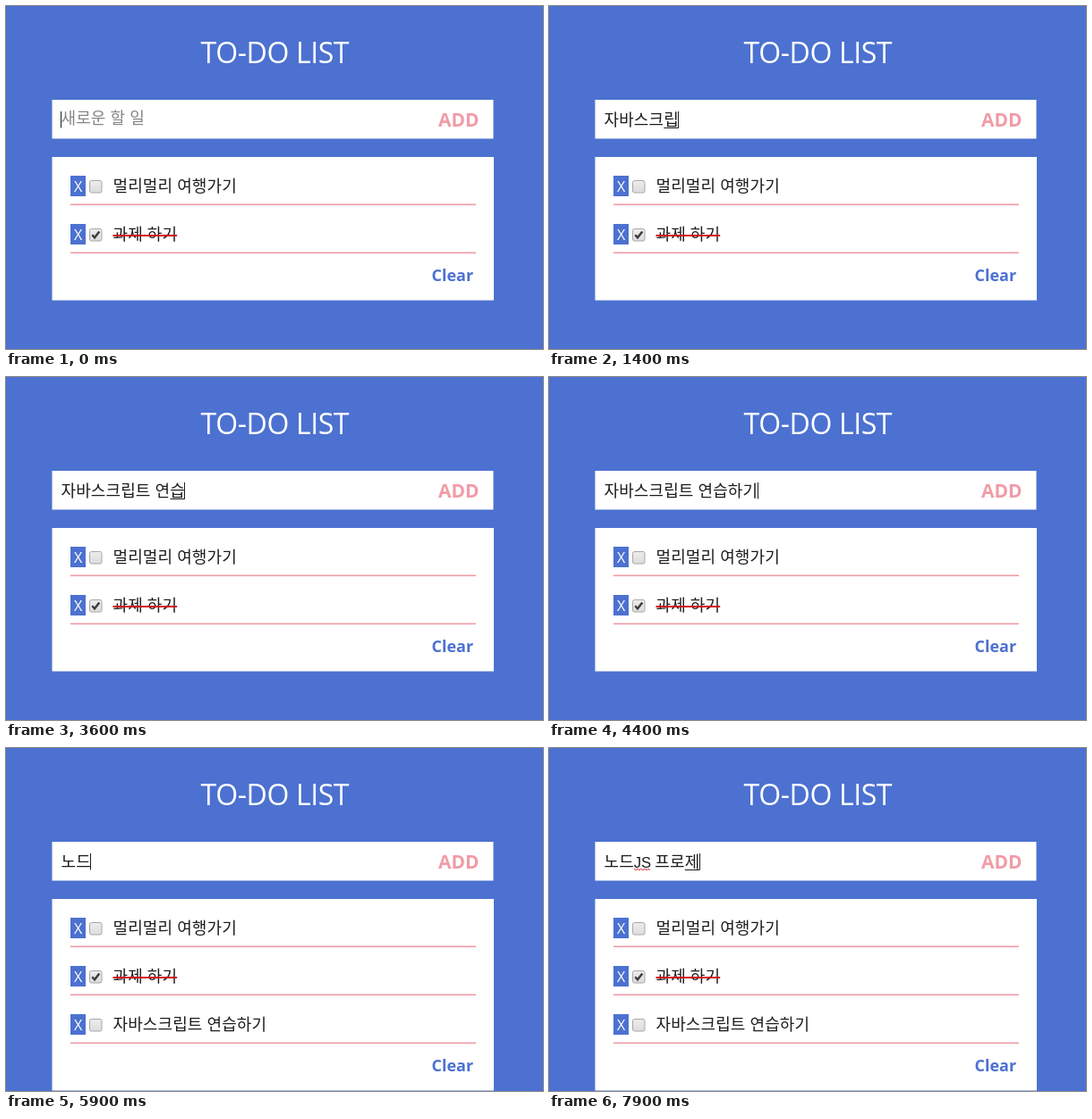
An HTML page with a canvas for the animation above (8000 ms loop, 600 px wide and 384 px high).

```html
<!DOCTYPE html>
<html lang="ko">
<head>
<meta charset="utf-8">
<title>To-do list</title>
<style>
html, body { margin: 0; width: 600px; height: 384px; overflow: hidden; background: #4c71d0; }
canvas { display: block; width: 600px; height: 384px; }
</style>
</head>
<body>
<canvas id="stage" width="600" height="384"></canvas>
<script>
const ctx = document.getElementById('stage').getContext('2d');
const BLUE = '#4c71d0', PINK = '#f19ba6', INK = '#1c1c1c';
const LATIN = '"Open Sans", "Noto Sans", sans-serif';
const HANGUL = '18px "Noto Sans CJK KR", "Noto Sans CJK", sans-serif';
const LOOP = 8000, ADDED = 4500, ROW = 54, LEFT = 61.5;

// Each key: time, text in the field, whether its last syllable is being composed
const keys = [];
function type(start, step, prefix, states) {
  states.split(' ').forEach((s, i) => keys.push([start + i * step, prefix + s, true]));
}
function commit(time, text) {
  keys.push([time, text, false]);
}
commit(0, '');
type(300, 100, '', 'ㅈ 자 잡 자바 자밧 자바스 자바슥 자바스크 자바스클 자바스크리 자바스크립');
type(2000, 200, '자바스크립', 'ㅌ 트');
commit(2700, '자바스크립트 ');
type(2900, 140, '자바스크립트 ', 'ㅇ 여 연 연ㅅ 연스 연습');
type(3750, 150, '자바스크립트 연습', 'ㅎ 하 학 하기');
commit(4300, '자바스크립트 연습하기');
commit(ADDED, '');
type(5500, 100, '', 'ㄴ 노 녿 노드');
commit(5900, '노드');
commit(6600, '노드J');
commit(6900, '노드JS');
commit(7100, '노드JS ');
type(7400, 100, '노드JS ', 'ㅍ 프 플 프로 프롲 프로제');

function rect(x, y, w, h, color) {
  ctx.fillStyle = color;
  ctx.fillRect(x, y, w, h);
}

function label(text, x, y, font, color, spacing = 0) {
  ctx.font = font;
  ctx.letterSpacing = spacing + 'px';
  ctx.wordSpacing = '0px';
  ctx.fillStyle = color;
  ctx.fillText(text, x, y);
}

// Draws mixed Korean and Latin text, returns its right edge
function write(text, x, y, color = INK) {
  ctx.fillStyle = color;
  for (const run of text.match(/[A-Z]+|[^A-Z]+/g) || []) {
    const latin = /[A-Z]/.test(run);
    ctx.font = latin ? '16.6px "Liberation Sans", Arial, sans-serif' : HANGUL;
    ctx.letterSpacing = latin ? '0px' : '0.1px';
    ctx.wordSpacing = latin ? '0px' : '0.9px';
    ctx.fillText(run, x, y);
    x += ctx.measureText(run).width;
  }
  return x;
}

function squiggle(x, end, y) {
  ctx.beginPath();
  ctx.moveTo(x, y);
  for (let i = 1; x + i * 2 <= end; i++) ctx.lineTo(x + i * 2, y + (i % 2 ? 2 : 0));
  ctx.strokeStyle = '#e0404a';
  ctx.lineWidth = 1;
  ctx.stroke();
}

function checkbox(x, y, checked) {
  const shade = ctx.createLinearGradient(0, y, 0, y + 14);
  shade.addColorStop(0, '#ededed');
  shade.addColorStop(1, '#dcdcdc');
  ctx.beginPath();
  ctx.roundRect(x + 0.5, y + 0.5, 13.5, 13.5, 2);
  ctx.fillStyle = shade;
  ctx.fill();
  ctx.strokeStyle = '#a8a8a8';
  ctx.lineWidth = 1;
  ctx.stroke();
  if (!checked) return;
  ctx.beginPath();
  ctx.moveTo(x + 3.3, y + 7.3);
  ctx.lineTo(x + 6, y + 10.3);
  ctx.lineTo(x + 11.3, y + 3.6);
  ctx.strokeStyle = '#3c3c3c';
  ctx.lineWidth = 2.4;
  ctx.stroke();
}

function item(text, row, done) {
  const y = 190 + row * ROW;
  rect(72, y, 17, 23, BLUE);
  label('X', 76, y + 18, '16px ' + LATIN, '#fff');
  checkbox(93, y + 5, done);
  const end = write(text, 119.5, y + 18);
  if (done) rect(119.5, y + 66 - 0.5 * 0 - 0 - ROW + ROW - 0, 0, 0, INK);
  if (done) rect(119.5, y + 12, end - 119.5, 2, '#d0141c');
  rect(72, y + 31.5, 453, 1.6, PINK);
}

function field(t) {
  rect(51.5, 105, 493, 43.5, '#fff');
  label('ADD', 483, 135, 'bold 21px ' + LATIN, PINK);
  const [time, text, composing] = keys.findLast(k => k[0] <= t);
  if (!text) write('새로운 할 일', LEFT, 131.5, '#858585');
  const end = write(text, LEFT, 133.5);
  if (composing) rect(end - 16.5, 136, 16.5, 1, INK);
  if (text.includes('JS ')) squiggle(95, 114, 135);
  if ((t - time) % 1000 < 500) rect(Math.floor(end), 118, 1, 18.5, INK);
}

function draw(now) {
  const t = now % LOOP, added = t >= ADDED, shift = added ? ROW : 0;
  rect(0, 0, 600, 384, BLUE);
  label('TO-DO LIST', 217.5, 63.5, '32px ' + LATIN, '#fff', -0.4);
  field(t);
  rect(51.5, 169, 493.5, 160.5 + shift, '#fff');
  item('멀리멀리 여행가기', 0, false);
  item('과제 하기', 1, true);
  if (added) item('자바스크립트 연습하기', 2, false);
  label('Clear', 475.5, 308 + shift, 'bold 18px ' + LATIN, BLUE);
}

const start = performance.now();
function tick() {
  draw(performance.now() - start);
  requestAnimationFrame(tick);
}
tick();
</script>
</body>
</html>
```
